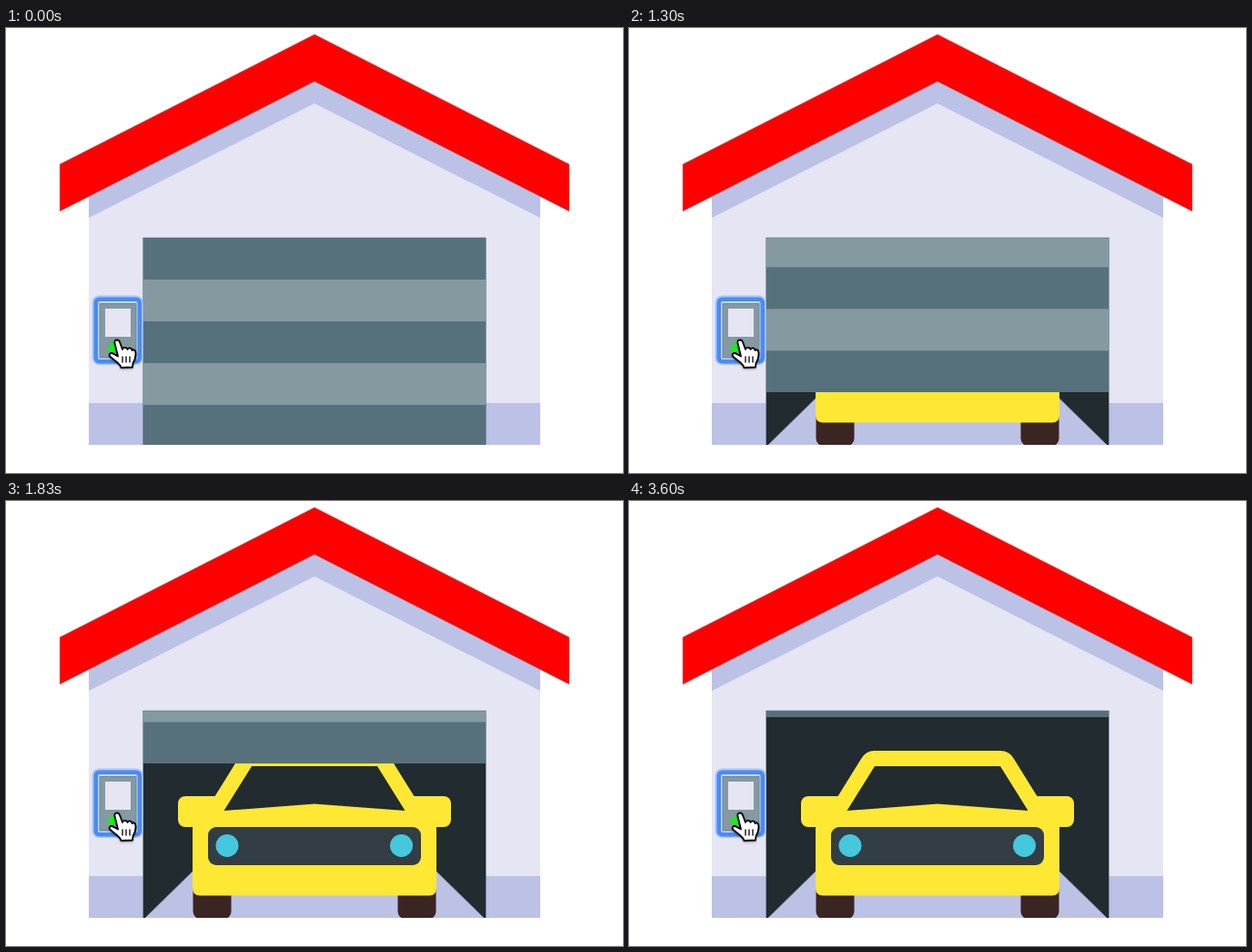
Write an HTML page that moves like this. It is 678x490 px and loops after 3.63 s.

```html
<!DOCTYPE html>
<html lang="en">
<head>
<meta charset="utf-8">
<title>Garage door</title>
<style>
  html, body { margin: 0; width: 100%; height: 100%; overflow: hidden; background: #fff; }
  svg { display: block; width: 678px; height: 490px; }
  .door { animation: door 3630ms linear infinite; }
  .press { animation: press 3630ms step-end infinite; }

  @keyframes door {
    0% { transform: translateY(0); }
    25.923% { transform: translateY(0); animation-timing-function: ease; }
    79.091%, 98.292% { transform: translateY(-225.4px); }
    100% { transform: translateY(-221.3px); }
  }
  @keyframes press {
    0% { opacity: 0; }
    22.8% { opacity: 1; }
    25.7% { opacity: 0; }
    95.3% { opacity: 1; }
    98.1%, 100% { opacity: 0; }
  }
</style>
</head>
<body>
<svg viewBox="0 0 678 490">
  <defs>
    <clipPath id="opening"><rect x="151" y="231" width="376" height="228"/></clipPath>
    <filter id="shadow" x="-30%" y="-30%" width="160%" height="160%">
      <feDropShadow dx="0" dy="1" stdDeviation="1" flood-opacity=".35"/>
    </filter>
  </defs>

  <!-- House -->
  <path fill="#e5e5f3" d="M91 459V185L339 59L587 185V459Z"/>
  <path fill="#bcc1e6" d="M91 185L339 59L587 185V209L339 83L91 209ZM91 413H587V459H91Z"/>
  <path fill="#f00" d="M59 150L339 7L619 150V202L339 59L59 202Z"/>
  <path fill="none" stroke="#8a9a9a" stroke-opacity=".5" d="M59 150L339 7L619 150M59 202L339 59L619 202"/>

  <g clip-path="url(#opening)">
    <rect x="151" y="231" width="376" height="228" fill="#222b2f"/>
    <path fill="#bcc1e6" stroke="#8f96a8" stroke-width=".7" d="M152 460L206 407H472L526 460Z"/>

    <!-- Car -->
    <g fill="#3b2523">
      <rect x="205.5" y="415" width="42" height="45" rx="8"/>
      <rect x="430.5" y="415" width="42" height="45" rx="8"/>
    </g>
    <g fill="#fee834">
      <path d="M229 326L255 284Q260 275 270 275H408Q418 275 423 284L449 326Z"/>
      <rect x="189" y="325" width="300" height="34" rx="8"/>
      <path d="M205 340H473V426Q473 434.500 465 434.500H213Q205 434.500 205 426Z"/>
    </g>
    <path fill="#222b2f" d="M270 292H408L438.500 341L339 333.500L239.500 341Z"/>
    <rect x="222" y="359" width="234" height="42" rx="9" fill="#333d46"/>
    <g fill="#45c8dc">
      <circle cx="243" cy="379.500" r="12.500"/>
      <circle cx="434.500" cy="379.500" r="12.500"/>
    </g>

    <g class="door">
      <rect x="151" y="231" width="376" height="230" fill="#56717c"/>
      <path fill="#8599a1" d="M151 277H527V323H151ZM151 369H527V415H151Z"/>
    </g>
  </g>
  <path fill="none" stroke="#56717c" stroke-opacity=".6" d="M150.500 459V231H527.500V459"/>

  <!-- Wall button with focus outline -->
  <rect x="94.500" y="294.500" width="56" height="76.500" rx="8" fill="#a9c6f8"/>
  <rect x="96.500" y="296.500" width="52.500" height="73" rx="6" fill="#4a8bf3"/>
  <rect x="101" y="301" width="43.500" height="64" rx="2" fill="#c3d7fa"/>
  <rect x="103" y="303.500" width="40" height="59.500" fill="#8599a1" stroke="#6f868f"/>
  <rect x="109" y="309" width="28" height="31" fill="#e5e5f3"/>
  <path fill="#0f0" d="M117 345L111 355.500H123Z"/>

  <g class="press" fill="none">
    <circle cx="123" cy="342" r="61.200" stroke="#fff" stroke-width="5"/>
    <circle cx="123" cy="342" r="61.200" stroke="#000" stroke-width="2.700"/>
  </g>

  <!-- Pointer -->
  <g stroke="#000" stroke-linejoin="round" stroke-linecap="round" filter="url(#shadow)">
    <path fill="#fff" stroke-width="1.800" d="M119.500 347Q119 343.500 121.800 343.500Q124 343.300 125 346L128 354Q128.800 351.500 131 352Q133 352 133.600 354Q134.500 352 136.800 352.600Q138.300 353 138.600 355Q139.500 353.800 141 354.600Q142.600 355.500 142.500 359Q142.300 365 139.500 369L139 373.500L126.500 374Q125.500 371 122.500 368.500L114.500 362Q113 360 114.300 358.600Q116 357.300 118.500 359L123 361.500Z"/>
    <path fill="none" stroke-width="1.300" d="M128 362V368M132 362V368M136 362V368"/>
  </g>
</svg>
</body>
</html>
```
